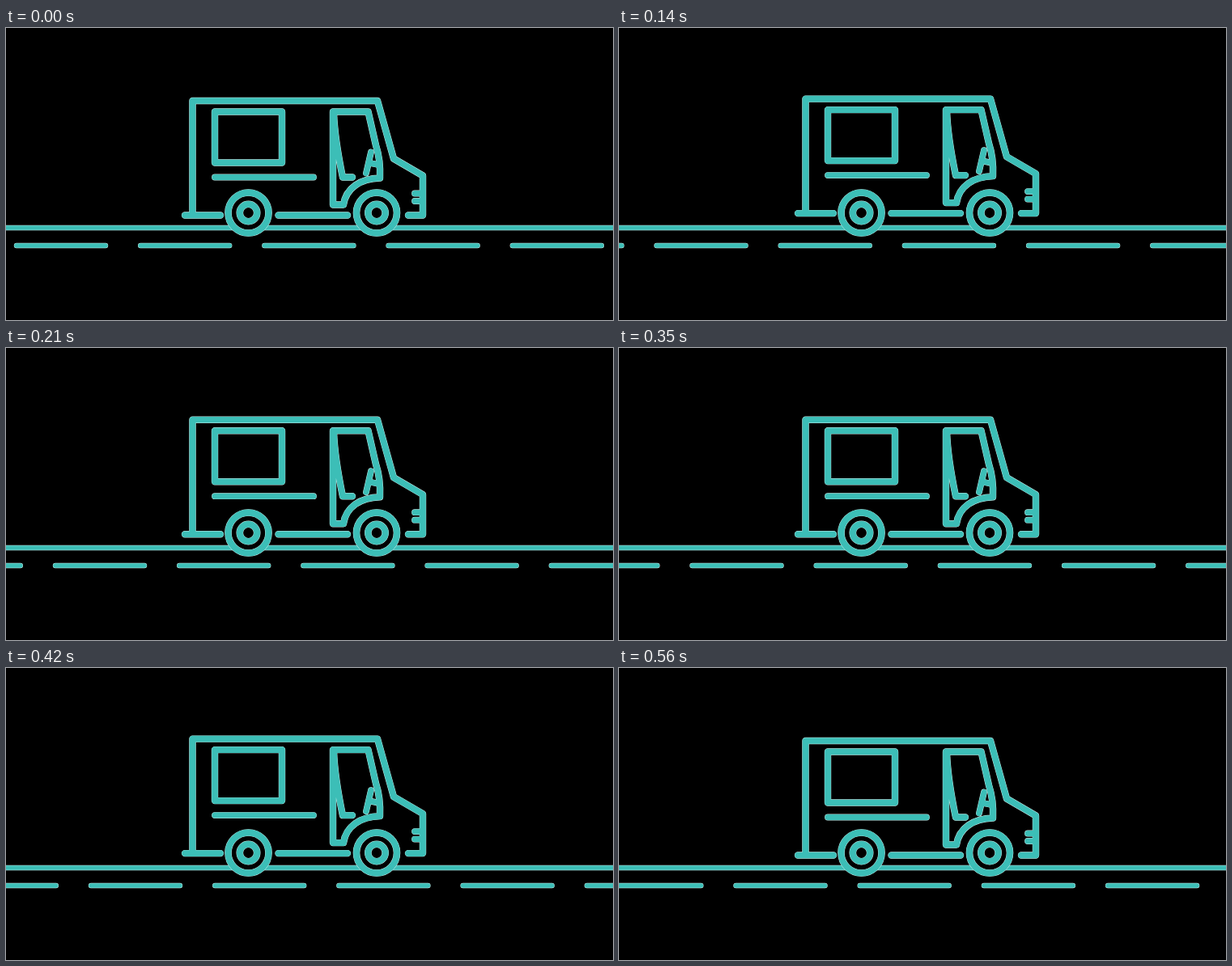
Write an HTML page with a canvas that moves like this. It is 750x361 px and loops after 0.63 s.

```html
<!DOCTYPE html>
<html lang="en">
<head>
<meta charset="utf-8">
<title>Van on the road</title>
<style>
  html, body { margin: 0; width: 100%; height: 100%; overflow: hidden; background: #000; }
  canvas { display: block; }
</style>
</head>
<body>
<canvas id="stage" width="750" height="361"></canvas>
<script>
const ctx = document.getElementById('stage').getContext('2d');
const TEAL = '#3cbeb7', EDGE = '#cdece9';
const STEP = 70;
const DASH_PERIOD = 153.2, DASH_LENGTH = 110;
const dashShift = [0, 19, 33.5, 48, 63.5, 77.5, 92, 111, 131.5];
const bodyLift = [0, 1.3, 2.4, 1.3];

const body = new Path2D(`
  M221 231.5H265 M230.5 231V90H459L479 161.5L515 182.5V231.5H497
  M336.5 231.5H422
  M258 103.5H341V166.5H258Z
  M404 103.5H447.5L457 145Q463 163 462 185.5C438 186 420 198 417 218.5H404Z
  M405 105Q406 136 416 184.5H428`);
const details = new Path2D(`
  M258 184.5H380
  M451 153.5L445 179.5 M450 167L460 169
  M505 204.5H513 M505 214H513`);

const wheels = new Path2D();
const tyres = new Path2D();
for (const x of [299.5, 458]) {
  tyres.moveTo(x + 25, 228.5);
  tyres.arc(x, 228.5, 25, 0, Math.PI * 2);
  wheels.moveTo(x + 10.7, 228.5);
  wheels.arc(x, 228.5, 10.7, 0, Math.PI * 2);
}
wheels.addPath(tyres);

const road = new Path2D('M-10 247H760');

// A slightly wider pale pass leaves a thin light rim around the teal.
function drawOutlined(parts) {
  for (const [color, extra] of [[EDGE, 0.8], [TEAL, 0]]) {
    ctx.strokeStyle = color;
    for (const [path, width, lift = 0] of parts) {
      ctx.save();
      ctx.translate(0, -lift);
      ctx.lineWidth = width + extra;
      ctx.stroke(path);
      ctx.restore();
    }
  }
}

function dashes(shift) {
  const path = new Path2D();
  for (let x = 13 + shift - DASH_PERIOD; x < 760; x += DASH_PERIOD) {
    path.moveTo(x, 269);
    path.lineTo(x + DASH_LENGTH, 269);
  }
  return path;
}

function draw(now) {
  const step = Math.floor(now / STEP) % dashShift.length;
  const lift = bodyLift[step % bodyLift.length];
  ctx.fillStyle = '#000';
  ctx.fillRect(0, 0, 750, 361);
  ctx.lineCap = ctx.lineJoin = 'round';
  drawOutlined([[road, 5.5], [dashes(dashShift[step]), 5.6]]);
  ctx.fill(tyres);
  drawOutlined([[body, 7.6, lift], [details, 7, lift], [wheels, 7.8]]);
}

const start = performance.now();
function tick() {
  draw(performance.now() - start);
  requestAnimationFrame(tick);
}
tick();
</script>
</body>
</html>
```
